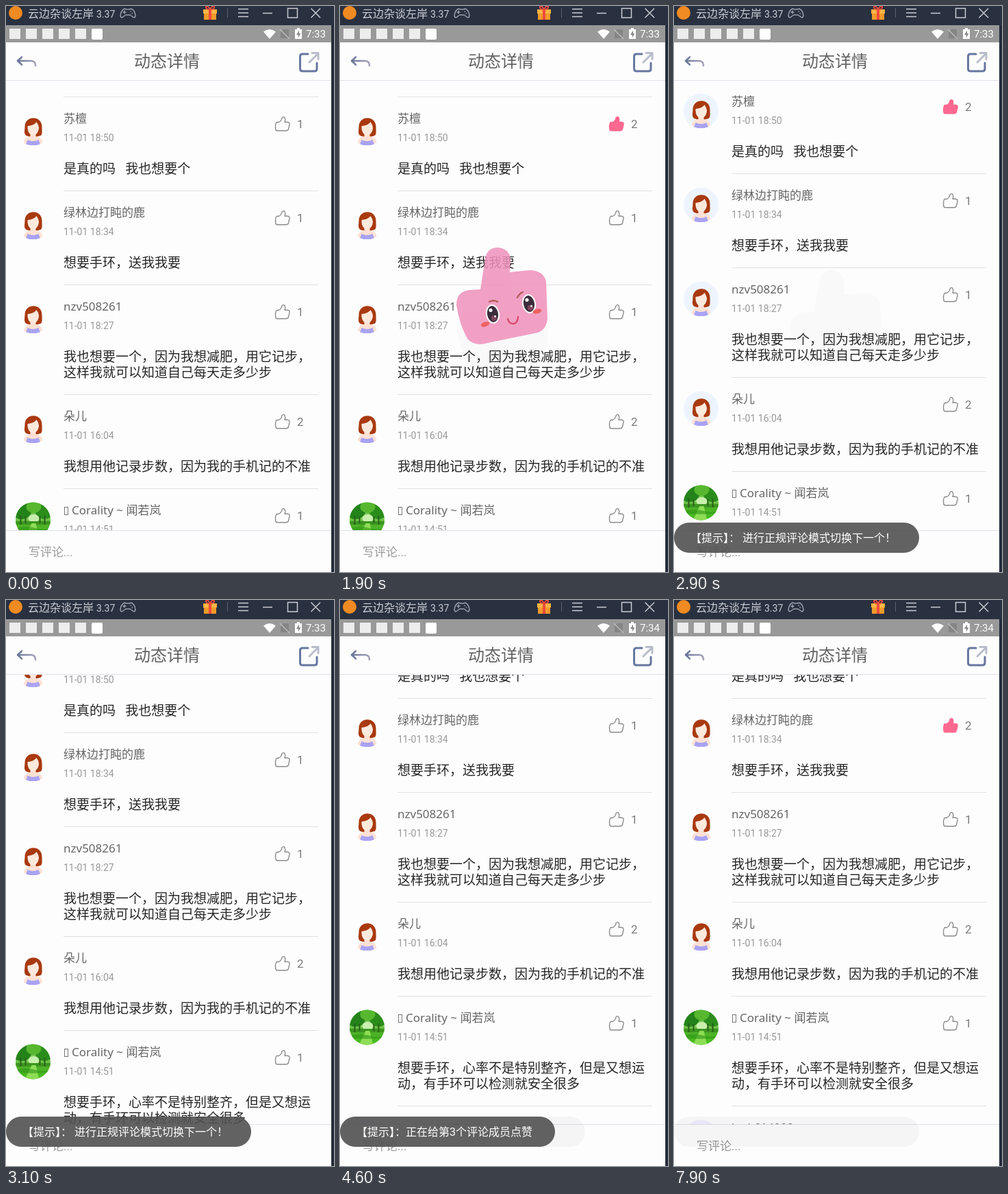
Animation of 479 by 825 pixels, one loop 8000 ms. Source, as an HTML page:

```html
<!DOCTYPE html>
<html lang="zh-CN">
<head>
<meta charset="utf-8">
<title>动态详情</title>
<style>
html, body { margin: 0; width: 100%; height: 100%; overflow: hidden; background: #252c3b; }
svg { display: block; }
text { font-family: Roboto, "Noto Sans CJK SC", "Noto Sans CJK", sans-serif; }
.mid { font-family: "Noto Sans CJK TC", "Noto Sans CJK", sans-serif; }
.name { font: 17px "Noto Sans", "Noto Sans CJK SC", "Noto Sans CJK", sans-serif; fill: #666; }
.time { font-size: 14px; fill: #999; }
.body { font-size: 19px; fill: #262626; }
.count { font-size: 17px; fill: #7c7c7c; }
.toast { font-size: 16px; fill: #fff; }
.hand { fill: none; stroke: #8c8c8c; stroke-width: 1.4; stroke-linejoin: round; }
.line { fill: none; stroke-linecap: round; stroke-linejoin: round; }

/* One 8 s loop; 1.25% is 100 ms. */
.anim { animation: 8s step-end infinite; }
#list { animation-name: scroll; }
.halo { animation-name: halo; }
.old { animation-name: old; }
.new { animation-name: new; }
#tip1 { animation-name: tip1; }
#tip2 { animation-name: tip2; }
#trace { animation-name: trace; }
#rise { animation-name: rise; }
#fade { animation-name: fade; }
#shade { animation-name: shade; }
.tap0 { animation-name: tap0; }
.tap1 { animation-name: tap1; }
.ink0 { animation-name: ink0; }
.ink1 { animation-name: ink1; }
.one0 { animation-name: one0; }
.two0 { animation-name: two0; }
.one1 { animation-name: one1; }
.two1 { animation-name: two1; }

@keyframes scroll {
  0% { transform: translateY(0); }
  36.25% { transform: translateY(-25px); }
  37.5% { transform: translateY(-50px); }
  38.75% { transform: translateY(-76px); }
  41.25% { transform: translateY(-101px); }
  42.5%, 100% { transform: translateY(-126px); }
}
@keyframes halo { 0% { opacity: 0; } 36.25% { opacity: 1; } 37.5%, 100% { opacity: 0; } }
@keyframes old { 0% { opacity: 1; } 40%, 100% { opacity: 0; } }
@keyframes new { 0% { opacity: 0; } 40%, 100% { opacity: 1; } }
@keyframes tip1 { 0% { opacity: 0; } 36.25% { opacity: 1; } 57.5%, 100% { opacity: 0; } }
@keyframes tip2 { 0% { opacity: 0; } 57.5% { opacity: 1; } 80% { opacity: .63; } 81.25%, 100% { opacity: 0; } }
@keyframes trace { 0% { opacity: 0; } 57.5%, 100% { opacity: .03; } }
@keyframes shade { 0% { opacity: 0; } 16.25% { opacity: .014; } 37.5%, 100% { opacity: 0; } }
@keyframes rise {
  0% { transform: translateY(33px); }
  15% { transform: translateY(33px); animation-timing-function: steps(6); }
  22.5%, 100% { transform: translateY(0); }
}
@keyframes fade {
  0% { opacity: 0; }
  15% { opacity: .4; }
  16.25% { opacity: .8; }
  17.5% { opacity: 1; }
  23.75% { opacity: .87; }
  25% { opacity: .56; }
  26.25% { opacity: .25; }
  27.5%, 100% { opacity: 0; }
}
@keyframes tap0 {
  0% { transform: scale(1); }
  10% { transform: scale(.6); }
  11.25% { transform: scale(.8); }
  12.5%, 100% { transform: scale(1); }
}
@keyframes tap1 {
  0% { transform: scale(1); }
  95% { transform: scale(.6); }
  96.25% { transform: scale(.85); }
  97.5% { transform: scale(1.36); }
  98.75%, 100% { transform: scale(1); }
}
@keyframes ink0 { 0% { fill: none; stroke: #8c8c8c; } 11.25%, 100% { fill: #ff6890; stroke: #ff6890; } }
@keyframes ink1 { 0% { fill: none; stroke: #8c8c8c; } 96.25%, 100% { fill: #ff6890; stroke: #ff6890; } }
@keyframes one0 { 0% { opacity: 1; } 11.25%, 100% { opacity: 0; } }
@keyframes two0 { 0% { opacity: 0; } 11.25%, 100% { opacity: 1; } }
@keyframes one1 { 0% { opacity: 1; } 96.25%, 100% { opacity: 0; } }
@keyframes two1 { 0% { opacity: 0; } 96.25%, 100% { opacity: 1; } }
</style>
</head>
<body>
<svg width="479" height="825" viewBox="0 0 479 825">
  <defs>
    <clipPath id="round"><circle r="25.5"/></clipPath>
    <linearGradient id="leaf" x1="0" y1="0" x2="0" y2="1">
      <stop offset="0" stop-color="#2f9a1c"/><stop offset=".42" stop-color="#8fd465"/>
      <stop offset=".58" stop-color="#4fae2a"/><stop offset="1" stop-color="#45c01c"/>
    </linearGradient>
    <linearGradient id="back" x1="16" x2="45" y1="80" y2="80" gradientUnits="userSpaceOnUse">
      <stop offset="0" stop-color="#68759a"/><stop offset="1" stop-color="#aaa7bd"/>
    </linearGradient>
    <g id="girl" clip-path="url(#round)">
      <path d="M-12-2C-12-19 13-19 13-2C13 5 14 9 11 11Q0 15-10 11C-14 8-12 3-12-2Z" fill="#a9390f"/>
      <path d="M-4 7H4V12Q13 13 14 21L9 24H-9L-14 21Q-12 13-4 12Z" fill="#fde1d4"/>
      <path d="M-8 17Q0 21 8 17L11 25H-11Z" fill="#a9a3f4"/>
      <path d="M-8-3Q2-4 5-9Q8-5 8.500-1C8.500 6 4 10.500 0 10.500S-8.500 6-8-3Z" fill="#fee9dd"/>
    </g>
    <g id="park" clip-path="url(#round)">
      <rect x="-26" y="-26" width="52" height="52" fill="url(#leaf)"/>
      <ellipse cx="-17" cy="-14" rx="15" ry="13" fill="#23831a"/>
      <ellipse cx="17" cy="-14" rx="14" ry="13" fill="#2a8d1b"/>
      <ellipse cx="1" cy="-19" rx="11" ry="9" fill="#57b82f"/>
      <ellipse cx="1" cy="-2" rx="8" ry="6" fill="#c9efae"/>
      <path d="M-26 2H26V7H-26Z" fill="#3b951f"/>
      <path d="M-18-6V7M-11-5V5M10-5V5M17-6V7" stroke="#285f18" stroke-width="2"/>
      <path d="M-2 5H4L9 26H-12Z" fill="#8ddd55"/>
      <path d="M-26 12Q-10 8 4 12T26 11V15Q8 18-26 16Z" fill="#2f9417" opacity=".6"/>
    </g>
    <circle id="moon" r="25.5" fill="#f1efff"/>
    <path id="hand" d="M-9-2.500H-6Q-1.500-4.500-1-9Q1-11.500 3-9.500Q4.500-6.500 3-2.800H7Q10.600-2.500 10 .8L8.600 7Q7.800 9.800 5 9.800H-8Q-10.200 9.600-10.200 7Q-11.200 1.500-9-2.500Z"/>
    <path id="thumb" d="M205 413L212 368Q215 352 231 352Q248 354 249 370L248 388L278 385Q297 386 301 401L303 455Q302 471 289 476L216 491Q197 497 186 485Q174 463 170 436Q170 416 189 414Z"/>
  </defs>

  <rect y="53" width="475" height="772" fill="#fdfdfd"/>
  <use id="shade" class="anim" href="#thumb" y="33"/>
  <g id="list" class="anim"></g>

  <g id="fade" class="anim"><g id="rise" class="anim">
    <use href="#thumb" fill="#f093bd"/>
    <g id="eyes"></g>
    <g class="line" stroke="#a8433f" stroke-width="2.400">
      <path d="M218 431Q224 428 230 431M259 425Q262 419 267 417"/>
      <path d="M245 456Q247 464 254 463Q260 461 260 453" stroke="#d6315c"/>
    </g>
    <g fill="#ec4b4b">
      <ellipse rx="6.500" ry="3.300" transform="translate(212 464) rotate(-18)"/>
      <ellipse rx="6.500" ry="3.300" transform="translate(288 445) rotate(-14)"/>
    </g>
  </g></g>

  <!-- comment box -->
  <rect y="764" width="475" height="61" fill="#fdfdfd"/>
  <rect y="764" width="475" height="1" fill="#dde1e8"/>
  <text x="33" y="802" font-size="17" fill="#999">写评论...</text>

  <!-- page header -->
  <rect y="53" width="475" height="55" fill="#fdfdfd"/>
  <rect y="108" width="475" height="1" fill="#e6dee9"/>
  <text x="187" y="89" font-size="24" fill="#616161">动态详情</text>
  <path class="line" stroke="url(#back)" stroke-width="2.600" d="M23 74.500L17 80L23 85.500M18 80H37Q43 80.500 43 87"/>
  <g class="line" stroke-width="3">
    <path stroke="#6777a0" d="M441 70H433Q429.500 70 429.500 73.500V91.500Q429.500 95 433 95H450.500Q454 95 454 91.500V83"/>
    <path stroke="#b9bdcb" d="M443 82L455 70M447 68.500H456V77.500"/>
  </g>

  <!-- status bar -->
  <rect y="28" width="475" height="25" fill="#999"/>
  <g id="notes" fill="#ededed"></g>
  <rect x="125" y="33" width="16" height="16" rx="2" fill="#fff"/>
  <path d="M376 37.500Q385 30.500 394 37.500L385 48Z" fill="#fff"/>
  <path d="M405 34H413V47H401V38Z" fill="#858585"/>
  <path d="M400 34L414 48" stroke="#bbb" stroke-width="1.500"/>
  <path d="M425 32H429V34H432V48H422V34H425Z" fill="#fff"/>
  <path d="M428 35.500L424 42H426.700V46.500L430.300 40H428Z" fill="#888"/>
  <g font-size="15" fill="#fff">
    <text class="anim old" x="438" y="46">7:33</text>
    <text class="anim new" x="438" y="46">7:34</text>
  </g>

  <!-- window title bar -->
  <rect width="479" height="28" fill="#293040"/>
  <rect x="475" y="28" width="4" height="797" fill="#252c3b"/>
  <circle cx="14" cy="10" r="10" fill="#f08a22"/>
  <text x="32" y="16.500" font-size="16" fill="#cbced4">云边杂谈左岸<tspan x="132" font-size="14">3.37</tspan></text>
  <g class="line" stroke="#9ba1ab" stroke-width="1.500">
    <path d="M173 4Q178 6 183 4Q188 6 189 14Q188 19 184 15L181 13H175L172 15Q168 19 167 14Q168 6 173 4ZM171 9H175M173 7V11M182 8H182.500M184 11H184.500"/>
  </g>
  <path d="M289 10H307V20H289Z" fill="#f39a2b"/>
  <path d="M288 5H308V11H288Z" fill="#ffb545"/>
  <path d="M296 5H300V20H296Z" fill="#ef4a3c"/>
  <path class="line" d="M298 5Q291 5 292 1Q295-1 298 5Q301-1 304 1Q305 5 298 5Z" stroke="#ef4a3c" stroke-width="2"/>
  <path d="M323.500 3V17" stroke="#596070"/>
  <path d="M339 4.500H354M339 10H354M339 15.500H354M375 10.500H389M411.500 3.500H425.500V17H411.500ZM445.500 3.500L459 17M459 3.500L445.500 17" fill="none" stroke="#c9ccd2" stroke-width="1.500"/>

  <g id="trace" class="anim"><rect y="753" width="358" height="44" rx="22"/></g>
  <g id="tip1" class="anim"></g>
  <g id="tip2" class="anim"></g>
</svg>
<script>
const $ = id => document.getElementById(id);

// Full-width marks sit in the middle of their cell.
const marks = s => s.replace(/[，！：]/g, '<tspan class="mid">$&</tspan>');
const text = (cls, x, y, s) => `<text class="${cls}" x="${x}" y="${y}">${marks(s)}</text>`;

const rows = [
  { name: '苏檀', time: '18:50', likes: 1, lines: ['是真的吗\u00a0\u00a0\u00a0我也想要个'], liked: true },
  { name: '绿林边打盹的鹿', time: '18:34', likes: 1, lines: ['想要手环，送我我要'], liked: true },
  { name: 'nzv508261', time: '18:27', likes: 1, lines: ['我也想要一个，因为我想减肥，用它记步，', '这样我就可以知道自己每天走多少步'] },
  { name: '朵儿', time: '16:04', likes: 2, lines: ['我想用他记录步数，因为我的手机记的不准'] },
  { name: 'Corality ~ 闻若岚', time: '14:51', likes: 1, lines: ['想要手环，心率不是特别整齐，但是又想运', '动，有手环可以检测就安全很多'], face: 'park', box: true },
  { name: 'bwk614092', time: '14:20', likes: 1, lines: [], face: 'moon' }
];

function rowMarkup(r, i, y) {
  const cls = k => r.liked ? `anim ${k}${i}` : '';
  const face = r.face || 'girl';
  return `<g transform="translate(0 ${y})">
    <rect x="84" width="372" height="1" fill="#e1e1e1"/>
    <g transform="translate(39.5 46)">
      ${face === 'girl' ? '<circle class="anim halo" r="25.5" fill="#edf4fe"/>' : ''}
      <use href="#${face}"/>
    </g>
    ${r.box ? '<rect x="85.5" y="27.5" width="5" height="11" fill="none" stroke="#777"/>' : ''}
    ${text('name', r.box ? 96 : 84, 38, r.name)}
    ${text('time', 84, 65, '11-01 ' + r.time)}
    <g transform="translate(404 40)"><g class="${cls('tap')}"><use href="#hand" class="hand ${cls('ink')}"/></g></g>
    ${text('count ' + cls('one'), 425, 46, String(r.likes))}
    ${r.liked ? text('count ' + cls('two'), 425, 46, String(r.likes + 1)) : ''}
    ${r.lines.map((s, n) => text('body', 84, 112 + 23 * n, s)).join('')}
  </g>`;
}

let top0 = 132;
$('list').innerHTML = rows.map((r, i) => {
  const html = rowMarkup(r, i, top0);
  top0 += r.lines.length > 1 ? 160 : 137;
  return html;
}).join('');

const toast = (w, s) =>
  `<rect y="753" width="${w}" height="44" rx="22" fill="#525252" fill-opacity=".9"/>` + text('toast', 24, 781, s);
$('tip1').innerHTML = toast(358, '【提示】：\u00a0进行正规评论模式切换下一个！');
$('tip2').innerHTML = toast(314, '【提示】：正在给第3个评论成员点赞');

$('notes').innerHTML = [5, 29, 53, 77, 101]
  .map(x => `<rect x="${x}" y="33" width="16" height="15"/>`).join('');

$('eyes').innerHTML = [[223, 449], [276, 434]].map(([x, y]) =>
  `<g transform="translate(${x} ${y}) rotate(-10)">
    <ellipse rx="10" ry="14" fill="#fff"/>
    <ellipse rx="8" ry="12" fill="#1d1020"/>
    <ellipse cx="1" cy="6" rx="4" ry="4" fill="#6a2a45"/>
    <circle cx="-2" cy="-6" r="2.6" fill="#fff"/>
    <circle cx="3" cy="4" r="1.4" fill="#fff"/>
  </g>`).join('');
</script>
</body>
</html>
```
